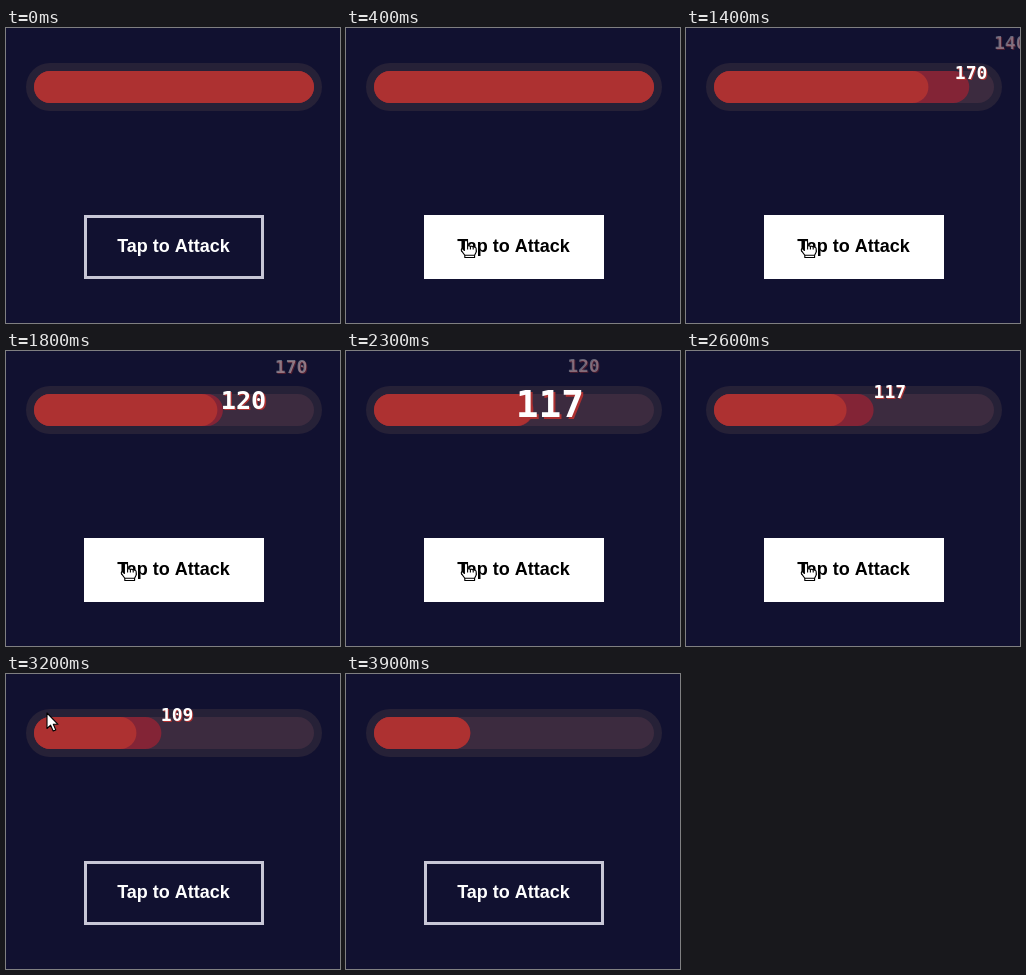
These frames come from a looping animation (334 px wide and 295 px high, 4100 ms). An HTML page with a canvas:

```html
<!DOCTYPE html>
<html lang="en">
<head>
<meta charset="utf-8">
<title>Health bar</title>
<style>
  html, body { margin: 0; width: 100%; height: 100%; overflow: hidden; background: #111130; }
  canvas { display: block; width: 334px; height: 295px; }
</style>
</head>
<body>
<canvas id="stage" width="334" height="295"></canvas>
<script>
const ctx = document.getElementById('stage').getContext('2d');
const LOOP = 4100, STEP = 100;
const BAR = { x: 28, y: 43, w: 280, h: 32 };
const MAX_HEALTH = 1000, DRAIN = 500, LAG_DELAY = 500;
const LABEL_LIFE = 800, PRESS = 65;
const RED = '#ad3131';

const hits = [[715, 140], [1128, 170], [1612, 120], [2245, 117], [2855, 109]]
  .map(([time, damage]) => ({ time, damage }));

// Cursor stops: time, x, y
const stops = [
  [200, 92, 129], [300, 112, 194], [400, 120, 212],
  [3000, 120, 212], [3100, 96, 150], [3200, 41, 39]
];

// Cubic Bézier easing with control points (x1, 0) and (x2, 1)
function bezier(x1, x2) {
  return p => {
    if (p <= 0) return 0;
    if (p >= 1) return 1;
    let lo = 0, hi = 1;
    for (let i = 0; i < 24; i++) {
      const s = (lo + hi) / 2, r = 1 - s;
      if (3 * x1 * s * r * r + 3 * x2 * s * s * r + s * s * s < p) lo = s;
      else hi = s;
    }
    return 3 * lo * lo - 2 * lo * lo * lo;
  };
}
const easeIn = bezier(0.42, 1);
const easeInOut = bezier(0.42, 0.58);
const mix = (a, b, p) => a + (b - a) * p;

const healthAt = t => hits.reduce((left, h) => h.time <= t ? left - h.damage : left, MAX_HEALTH);

// Value of an eased transition that is retargeted at each given time
function drained(t, times) {
  let from = MAX_HEALTH, to = MAX_HEALTH, start = 0;
  const valueAt = time => mix(from, to, easeInOut((time - start) / DRAIN));
  for (const time of times) {
    const target = healthAt(time);
    if (time > t || target === to) continue;
    from = valueAt(time);
    to = target;
    start = time;
  }
  return valueAt(t);
}

const hitTimes = hits.map(h => h.time);
const lagTimes = hitTimes.map(time => time + LAG_DELAY);
const toWidth = health => BAR.w * health / MAX_HEALTH;

function pill(x, y, w, h, color) {
  ctx.fillStyle = color;
  ctx.beginPath();
  ctx.roundRect(x, y, w, h, h / 2);
  ctx.fill();
}

function drawBar(t) {
  pill(BAR.x - 8, BAR.y - 8, BAR.w + 16, BAR.h + 16, '#262137');
  pill(BAR.x, BAR.y, BAR.w, BAR.h, '#3c2b3f');
  pill(BAR.x, BAR.y, toWidth(drained(t, lagTimes)), BAR.h, '#832436');
  pill(BAR.x, BAR.y, toWidth(drained(t, hitTimes)), BAR.h, RED);
}

function drawButton(t, hover) {
  const pressed = hits.some(h => t >= h.time - PRESS && t < h.time);
  const y = 187 + (pressed ? 1 : 0);
  if (hover) {
    ctx.fillStyle = '#fff';
    ctx.fillRect(78, y, 180, 64);
  } else {
    ctx.strokeStyle = '#c8c7d6';
    ctx.lineWidth = 3;
    ctx.strokeRect(79.5, y + 1.5, 177, 61);
  }
  ctx.font = 'bold 18px "Liberation Sans", Arial, sans-serif';
  ctx.textAlign = 'center';
  ctx.fillStyle = hover ? '#000' : '#fff';
  ctx.fillText('Tap to Attack', 167.5, y + 37);
}

function drawLabel(t, hit) {
  const age = t - hit.time;
  if (age < 0 || age >= LABEL_LIFE) return;
  const p = age / LABEL_LIFE;
  const scale = mix(2.2, 1, easeIn(p / 0.3));
  ctx.save();
  ctx.font = 'bold 18px "DejaVu Sans Mono", monospace';
  ctx.textAlign = 'center';
  const width = ctx.measureText(hit.damage).width;
  const left = BAR.x + toWidth(healthAt(hit.time) + hit.damage);
  ctx.globalAlpha = Math.min(1, (1 - p) / 0.4);
  ctx.translate(left + width / 2, 53 - 50 * easeIn(p));
  ctx.scale(scale, scale);
  ctx.fillStyle = RED;
  ctx.fillText(hit.damage, 1, 7.5);
  ctx.fillStyle = '#fff';
  ctx.fillText(hit.damage, 0, 6.5);
  ctx.restore();
}

function cursorAt(t) {
  if (t < stops[0][0] || t > stops[stops.length - 1][0]) return null;
  const i = Math.max(1, stops.findIndex(s => s[0] >= t));
  const [t0, x0, y0] = stops[i - 1], [t1, x1, y1] = stops[i];
  const p = (t - t0) / (t1 - t0);
  return { x: mix(x0, x1, p), y: mix(y0, y1, p) };
}

const arrow = new Path2D('M0 0V15.5L3.6 12.2L6.2 18L8.8 17L6.3 11.3H11Z');
const hand = new Path2D('M-1.6 10.5V1.8Q-1.6 .5 0 .5T1.6 1.8V6Q3 5.2 4.4 6.4Q6 5.8 7.2 7' +
  'Q10.2 6.8 10.2 9V12L8.6 15.3V17.5H-1.2V15.3L-4.6 10.6Q-5 8.6-3.4 8.6Z');
const knuckles = new Path2D('M1.6 6V9.5M4.4 6.6V9.5M7.2 7.2V9.5M-1.2 15.3H8.6');

function drawCursor({ x, y }, pointing) {
  const shape = pointing ? hand : arrow;
  ctx.save();
  ctx.translate(x, y);
  ctx.lineJoin = 'round';
  ctx.lineWidth = 1.1;
  ctx.fillStyle = '#fff';
  ctx.strokeStyle = '#000';
  ctx.fill(shape);
  ctx.stroke(shape);
  if (pointing) ctx.stroke(knuckles);
  ctx.restore();
}

function draw(t) {
  const cursor = cursorAt(t);
  const hover = !!cursor && cursor.x >= 78 && cursor.x < 258 && cursor.y >= 187 && cursor.y < 251;
  ctx.fillStyle = '#111130';
  ctx.fillRect(0, 0, 334, 295);
  drawBar(t);
  drawButton(t, hover);
  hits.forEach(hit => drawLabel(t, hit));
  if (cursor) drawCursor(cursor, hover);
}

const begin = performance.now();
function tick() {
  const t = (performance.now() - begin) % LOOP;
  draw(Math.floor(t / STEP) * STEP);
  requestAnimationFrame(tick);
}
tick();
</script>
</body>
</html>
```
